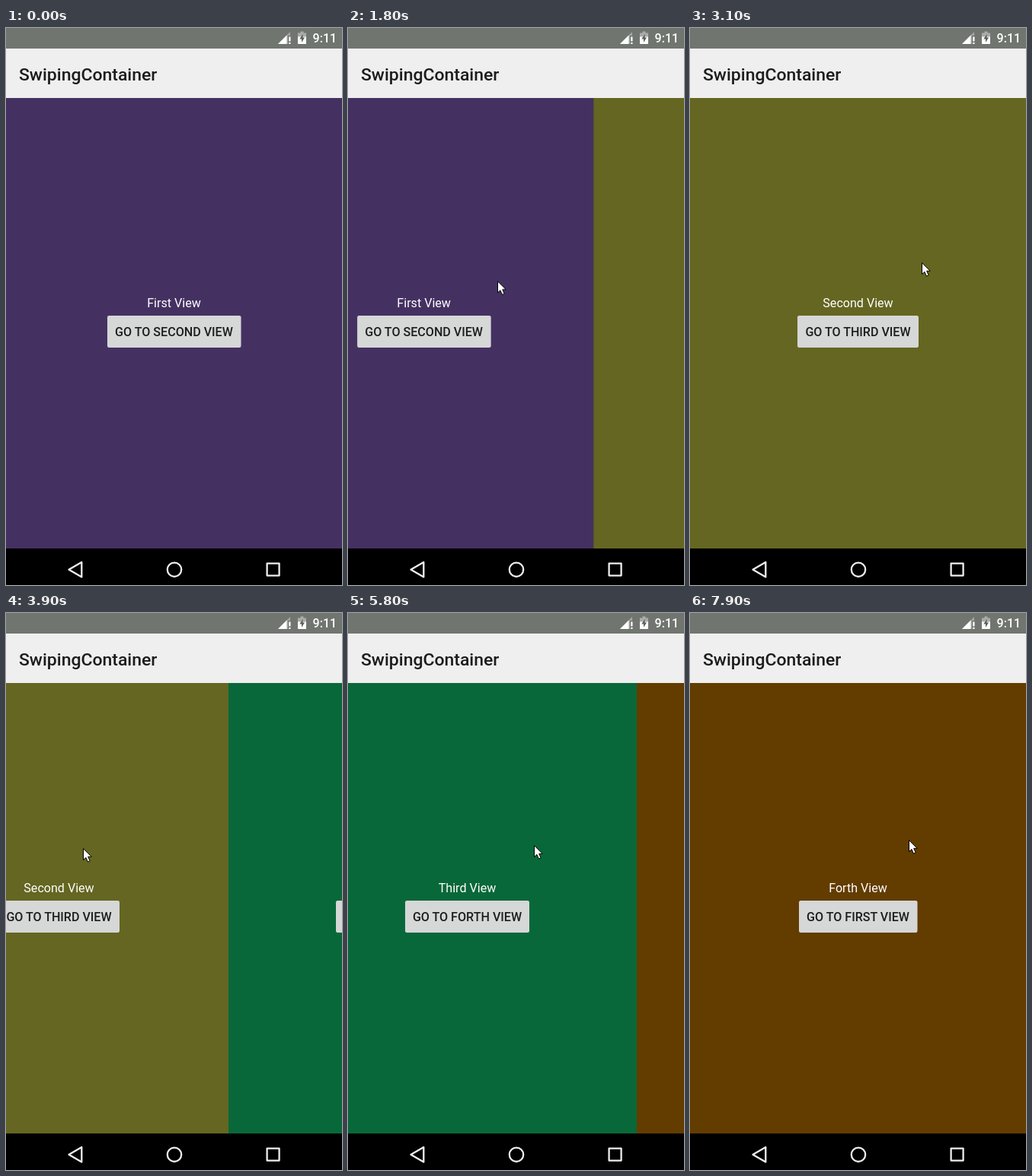
An HTML page that plays this animation: 441 by 732 pixels, repeating every 8000 ms.

```html
<!DOCTYPE html>
<html lang="en">
<head>
<meta charset="utf-8">
<title>SwipingContainer</title>
<style>
html, body { margin: 0; width: 100%; height: 100%; overflow: hidden; background: #000; }
svg { display: block; width: 441px; height: 732px; }
text { font: 400 16.08px Roboto, sans-serif; fill: #fff; }
.title { font-size: 22.97px; font-weight: 500; fill: #1c1c1c; }
.clock { font-weight: 500; }
.page text { text-anchor: middle; }
.page .action { font-weight: 500; fill: #1d1d1d; }
.page .button { fill: #d6d7d7; }
.nav { fill: none; stroke: #eee; stroke-width: 2.3; stroke-linejoin: round; }

/* Every segment holds by default; longer moves advance once per 100 ms. */
.strip, .cursor { animation: 8s steps(1) -5ms infinite; }
.strip { animation-name: swipe; }
.cursor { animation-name: point; }

@keyframes swipe {
  0% { transform: translateX(0); }
  15% { transform: translateX(-8px); }
  16.25% { transform: translateX(-23px); animation-timing-function: steps(7); }
  25% { transform: translateX(-160px); animation-timing-function: steps(2); }
  27.5% { transform: translateX(-218px); }
  28.75% { transform: translateX(-274px); }
  30% { transform: translateX(-345px); }
  31.25% { transform: translateX(-393px); }
  32.5% { transform: translateX(-424px); }
  33.75% { transform: translateX(-440px); }
  35% { transform: translateX(-445px); }
  42.5% { transform: translateX(-453px); }
  43.75% { transform: translateX(-469px); animation-timing-function: steps(2); }
  46.25% { transform: translateX(-520px); animation-timing-function: steps(2); }
  48.75% { transform: translateX(-596px); animation-timing-function: steps(2); }
  51.25% { transform: translateX(-716px); }
  52.5% { transform: translateX(-782px); }
  53.75% { transform: translateX(-830px); }
  55% { transform: translateX(-862px); }
  56.25% { transform: translateX(-881px); }
  57.5% { transform: translateX(-888px); }
  58.75% { transform: translateX(-890px); }
  70% { transform: translateX(-900px); }
  71.25% { transform: translateX(-926px); }
  72.5% { transform: translateX(-954px); animation-timing-function: steps(9); }
  83.75% { transform: translateX(-997px); }
  85% { transform: translateX(-1050px); }
  86.25% { transform: translateX(-1114px); }
  87.5% { transform: translateX(-1195px); }
  88.75% { transform: translateX(-1258px); }
  90% { transform: translateX(-1305px); }
  91.25% { transform: translateX(-1331px); }
  92.5%, 100% { transform: translateX(-1335px); }
}

@keyframes point {
  0% { transform: translate(500px, 228px); }
  3.75% { transform: translate(421px, 228px); animation-timing-function: steps(3); }
  7.5% { transform: translate(334px, 332px); }
  8.75% { transform: translate(328px, 328px); }
  11.25% { transform: translate(327px, 327px); }
  13.75% { transform: translate(318px, 327px); animation-timing-function: steps(2); }
  16.25% { transform: translate(286px, 328px); animation-timing-function: steps(7); }
  25% { transform: translate(160px, 334px); animation-timing-function: steps(2); }
  27.5% { transform: translate(88px, 337px); }
  28.75% { transform: translate(41px, 338px); }
  30% { transform: translate(36px, 337px); }
  31.25% { transform: translate(70px, 333px); animation-timing-function: steps(3); }
  35% { transform: translate(267px, 316px); }
  36.25% { transform: translate(286px, 312px); }
  38.75% { transform: translate(304px, 308px); }
  41.25% { transform: translate(294px, 308px); animation-timing-function: steps(2); }
  43.75% { transform: translate(252px, 308px); animation-timing-function: steps(4); }
  48.75% { transform: translate(101px, 309px); animation-timing-function: steps(2); }
  51.25% { transform: translate(42px, 312px); animation-timing-function: steps(2); }
  53.75% { transform: translate(38px, 316px); animation-timing-function: steps(7); }
  62.5% { transform: translate(312px, 306px); }
  63.75% { transform: translate(333px, 302px); }
  66.25% { transform: translate(328px, 302px); }
  67.5% { transform: translate(324px, 303px); }
  70% { transform: translate(304px, 304px); animation-timing-function: steps(2); }
  72.5% { transform: translate(244px, 305px); animation-timing-function: steps(9); }
  83.75% { transform: translate(205px, 306px); }
  85% { transform: translate(150px, 306px); }
  86.25% { transform: translate(97px, 306px); }
  87.5% { transform: translate(84px, 306px); animation-timing-function: steps(2); }
  90% { transform: translate(96px, 305px); animation-timing-function: steps(7); }
  98.75%, 100% { transform: translate(287px, 298px); }
}
</style>
</head>
<body>
<svg viewBox="0 0 441 732">
  <g class="strip">
    <g class="page">
      <rect x="-2" y="92" width="445" height="592" fill="#443162"/>
      <text x="220.5" y="367">First View</text>
      <rect class="button" x="133" y="378" width="175.5" height="42" rx="2.3"/>
      <text class="action" x="220.5" y="405">GO TO SECOND VIEW</text>
    </g>
    <g class="page" transform="translate(445)">
      <rect x="-2" y="92" width="445" height="592" fill="#646621"/>
      <text x="220.5" y="367">Second View</text>
      <rect class="button" x="141" y="378" width="159" height="42" rx="2.3"/>
      <text class="action" x="220.5" y="405">GO TO THIRD VIEW</text>
    </g>
    <g class="page" transform="translate(890)">
      <rect x="-2" y="92" width="445" height="592" fill="#096839"/>
      <text x="220.5" y="367">Third View</text>
      <rect class="button" x="139" y="378" width="163" height="42" rx="2.3"/>
      <text class="action" x="220.5" y="405">GO TO FORTH VIEW</text>
    </g>
    <g class="page" transform="translate(1335)">
      <rect x="-2" y="92" width="445" height="592" fill="#633c00"/>
      <text x="220.5" y="367">Forth View</text>
      <rect class="button" x="143" y="378" width="155.5" height="42" rx="2.3"/>
      <text class="action" x="220.5" y="405">GO TO FIRST VIEW</text>
    </g>
  </g>

  <rect width="441" height="27" fill="#717570"/>
  <rect y="27" width="441" height="65" fill="#efefef"/>
  <text class="title" x="17" y="69">SwipingContainer</text>

  <g fill="#fff">
    <path d="M357 21L373 5V10H370V21Z" opacity=".35"/>
    <path d="M357 21L368.5 9.5V21Z"/>
    <path d="M371.3 11.5h2.2v6h-2.2zM371.3 19h2.2v2h-2.2z"/>
    <path d="M383 12V6.5h3.5V4.5h4V6.5H394V12Z" opacity=".4"/>
    <path d="M383 11.5H394V21H383Z"/>
    <path d="M389.6 8L385.3 14.6H388V19L392 12.6H389.6Z" fill="#5b605b"/>
  </g>
  <text class="clock" x="402.5" y="19">9:11</text>

  <rect y="684" width="441" height="48"/>
  <g class="nav">
    <path d="M82.5 711.8L99.3 702V721.6Z"/>
    <circle cx="221" cy="711.8" r="9.2"/>
    <rect x="342.6" y="703.6" width="16" height="16"/>
  </g>

  <path class="cursor" d="M.5 .7V15.6L3.9 12.4L6.4 18.1L9.2 16.9L6.7 11.3H11.2Z" fill="#fff" stroke="#000"/>
</svg>
</body>
</html>
```
